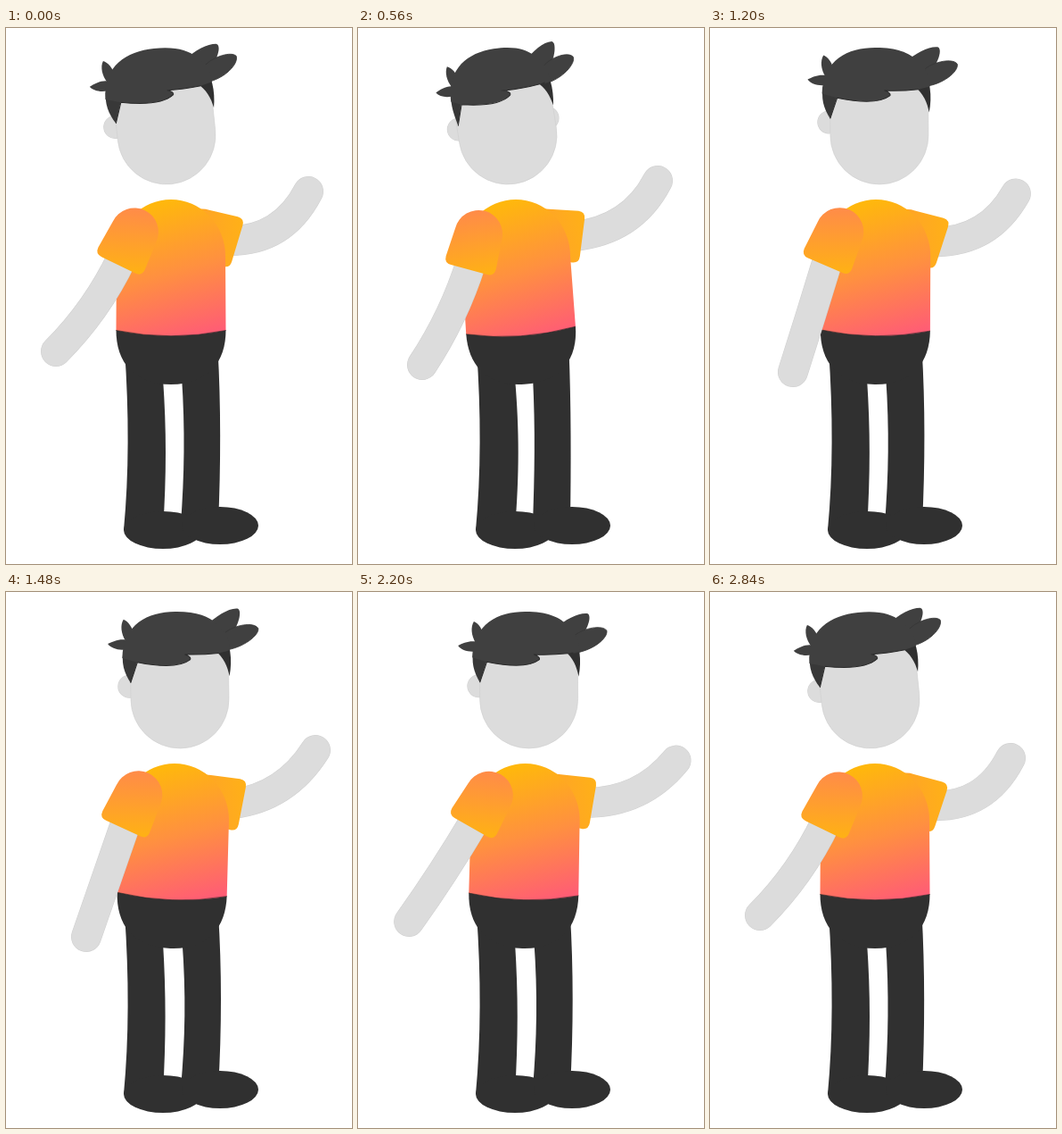
Recreate the animation shown at these times as an HTML page with a canvas. Size 388x600 px, loop 2880 ms.

```html
<!DOCTYPE html>
<html lang="en">
<head>
<meta charset="utf-8">
<title>Waving figure</title>
<style>
  html, body { margin: 0; width: 100%; height: 100%; overflow: hidden; background: #fff; }
  canvas { display: block; width: 388px; height: 600px; }
</style>
</head>
<body>
<canvas id="stage"></canvas>
<script>
const LOOP = 2880, STEP = 40, RAD = Math.PI / 180;
const SKIN = '#dcdcdc', SKIN_EDGE = '#cfcfcf', PANTS = '#303030', HAIR = '#404040';

const canvas = document.getElementById('stage');
const ctx = canvas.getContext('2d');
const scale = window.devicePixelRatio || 1;
canvas.width = 388 * scale;
canvas.height = 600 * scale;

// Smooth periodic track without overshoot between its keys.
function track(times, values) {
  const n = times.length;
  const time = i => times[(i + n) % n] + LOOP * Math.floor(i / n);
  const value = i => values[(i + n) % n];
  const span = i => time(i + 1) - time(i);
  const slope = i => (value(i + 1) - value(i)) / span(i);
  const tangent = i => {
    const a = slope(i - 1), b = slope(i);
    if (a * b <= 0) return 0;
    const h0 = span(i - 1), h1 = span(i);
    return 3 * (h0 + h1) / ((2 * h1 + h0) / a + (h1 + 2 * h0) / b);
  };
  return t => {
    let i = n - 1;
    while (times[i] > t) i--;
    const h = span(i), u = (t - time(i)) / h, v = 1 - u;
    return value(i) * v * v * (1 + 2 * u) + value(i + 1) * u * u * (3 - 2 * u)
      + h * u * v * (tangent(i) * v - tangent(i + 1) * u);
  };
}

const bodyTimes = [0, 560, 920, 1480, 1920, 2520, 2840];
const waveTimes = [0, 200, 560, 920, 1480, 1920, 2520, 2840];
const body = (...values) => track(bodyTimes, values);
const wave = (...values) => track(waveTimes, values);

const pose = {
  lean: body(0, -4, -1, 2, 4, -2, 0),
  headX: body(180, 168, 184, 195, 206, 174, 180),
  headTurn: body(-6, -9, 0, -0.8, 4.4, -6, -6),
  profile: body(0, 1, 0, 0, 0, 0.25, 0),
  ruffle: body(0, 0.7, 0, 0.9, 0, 1, 0),
  droop: body(0, 3.5, 0, 0, 1.5, 3.5, 0),
  frontSleeve: body(26, 15, 21.8, 24.7, 32.8, 25.6, 26),
  frontX: body(56, 72, 94, 90, 65, 53, 56),
  frontY: body(362, 377, 383, 386, 369, 369, 362),
  bow: body(11, 9, 2, 0, 0, 8, 11),
  backSleeve: wave(16.8, 10, 7.2, 25, 11, 12.7, 6, 18.5),
  backX: wave(339, 341, 336, 340, 347, 367, 341, 337),
  backY: wave(183, 172, 171, 194, 177, 200.5, 174, 186)
};

function fill(path, color) {
  ctx.fillStyle = color;
  ctx.fill(typeof path === 'string' ? new Path2D(path) : path);
}

function line(path, color, width) {
  ctx.strokeStyle = color;
  ctx.lineWidth = width;
  ctx.stroke(typeof path === 'string' ? new Path2D(path) : path);
}

function gradient(x0, y0, x1, y1, ...colors) {
  const g = ctx.createLinearGradient(x0, y0, x1, y1);
  colors.forEach((c, i) => g.addColorStop(i / (colors.length - 1), c));
  return g;
}

function at(x, y, degrees, draw) {
  ctx.save();
  ctx.translate(x, y);
  ctx.rotate(degrees * RAD);
  draw();
  ctx.restore();
}

function ellipse(x, y, rx, ry, color) {
  const path = new Path2D();
  path.ellipse(x, y, rx, ry, 0, 0, Math.PI * 2);
  fill(path, color);
}

function arm(x0, y0, cx, cy, x1, y1) {
  const path = `M${x0},${y0} Q${cx},${cy} ${x1},${y1}`;
  ctx.lineCap = 'round';
  line(path, SKIN_EDGE, 34);
  line(path, SKIN, 33);
  ctx.lineCap = 'butt';
}

function sleeve(x, y, degrees, from, to) {
  at(x, y, degrees, () => fill(
    'M-27,0 A27,27 0 0 1 27,0 L29,33 Q29,41 21,41 L-21,41 Q-29,41 -29,33 Z',
    gradient(-14, -22, 14, 42, from, to)));
}

function backArm(p) {
  const x = 220 + 2.3 * p.lean, y = 229.5 + Math.max(0, p.lean);
  const dx = Math.cos(p.backSleeve * RAD), dy = Math.sin(p.backSleeve * RAD);
  const stretch = Math.max(0, p.backX - 340);
  arm(x + 30 * dx, y + 30 * dy,
    p.backX - 29 - 0.65 * stretch, p.backY + 56 - 0.45 * stretch, p.backX, p.backY);
  sleeve(x, y, p.backSleeve - 90, '#ff9d30', '#ffb018');
}

function frontArm(p) {
  const x = 144 + 2.2 * p.lean, y = 228.5 - 0.6 * p.lean;
  const sx = x - 32 * Math.sin(p.frontSleeve * RAD), sy = y + 32 * Math.cos(p.frontSleeve * RAD);
  const dx = p.frontX - sx, dy = p.frontY - sy, k = p.bow / Math.hypot(dx, dy);
  arm(sx, sy, (sx + p.frontX) / 2 + dy * k, (sy + p.frontY) / 2 - dx * k, p.frontX, p.frontY);
  sleeve(x, y, p.frontSleeve, '#ff8c48', '#ffb016');
}

function legs(lean) {
  const s = lean / 2;
  fill(`M133,360 C138,430 138,500 132,562 L176,562
    C${180 - s / 2},500 ${180 - s / 2},450 176,392 L180,360 Z`, PANTS);
  fill(`M${197 + s / 2},390 C${201 + s},450 ${200 + s},500 196,556 L238,556
    C${241 + s},490 ${241 + s},420 ${237.5 + s / 2},360 L190,360 Z`, PANTS);
  ellipse(176, 562, 44, 21, PANTS);
  ellipse(240, 557, 43, 21, PANTS);
}

function torso(lean) {
  const hip = 185 + 0.6 * lean, chest = 185 + 2 * lean;
  const dx = 61.5 * Math.cos(lean * RAD), dy = 61.5 * Math.sin(lean * RAD);
  at(hip, 338, lean, () => fill('M-61.5,0 C-61.5,36 -42,61 0,61 C42,61 61.5,36 61.5,0 Z', PANTS));
  const hem = `${hip + dx},${338.5 + dy} Q${hip},351 ${hip - dx},${338.5 - dy}`;
  fill(`M${hip - dx},${338.5 - dy} L${chest - 61},255 A61,63 0 0 1 ${chest + 61},255 L${hem} Z`,
    gradient(chest - 17, 198, hip + 24, 348, '#ffb70d', '#ff9040', '#ff5c75'));
  line('M' + hem, '#262626', 0.6);
}

function leaves(ruffle) {
  const tip = -96 - 5 * ruffle, side = 87 + 2 * ruffle, low = -80 + 2 * ruffle;
  fill('M-50,-70 C-52,-82 -57,-88 -62,-90 C-66,-84 -65,-74 -60,-66 Z', HAIR);
  fill('M-56,-66 C-64,-70 -74,-66 -80,-63 C-76,-57 -64,-54 -54,-58 Z', HAIR);
  fill(`M30,-82 C42,-92 56,${tip - 1} 66,${tip} C72,${tip + 2} 66,-80 60,-74 L44,-68 Z`, HAIR);
  const lock = `M52,-74 C62,-82 ${side - 5},-86 ${side},${low} C${side + 2},-71 72,-56 50,-54`;
  fill(lock, HAIR);
  line(lock, '#363636', 0.8);
}

function hair(p) {
  const slide = -5 * p.profile;
  const burn = `${slide - 55},-19`;
  const fringe = `Q24,-49 ${6 + slide},-50 C${10 + slide},-49 ${14 + slide},-46 ${12 + slide},-44
    C${4 + slide},-38 ${slide - 14},-35 ${slide - 47},-42`;
  fill(`M-62,-58 C-66,-42 -62,-30 ${burn} L${slide - 47},-43 Z`, '#383838');
  fill('M40,-54 C50,-46 54,-36 56,-25 C60,-44 57,-62 50,-74 Z', PANTS);
  at(0, p.droop, 0, () => leaves(p.ruffle));
  fill(`M-64,-47 C-62,-85 -35,-98 -4,-98 C20,-98 34,-92 42,-84 C52,-76 57,-66 57,-54
    L44,-51 ${fringe} Z`, HAIR);
  line(`M44,-51 ${fringe} L${burn}`, '#2b2b2b', 1);
}

function head(p) {
  at(p.headX, 120, p.headTurn, () => {
    for (const x of [3 * p.profile - 56.5, 37 + 10 * p.profile]) {
      const y = x < 0 ? -15 : -12;
      ellipse(x, y, 13, 13, SKIN_EDGE);
      ellipse(x, y, 12.5, 12.5, SKIN);
    }
    const face = 'M-55,-58 L-55,0 A55,55 0 0 0 55,0 L55,-58 Z';
    fill(face, SKIN);
    line(face, SKIN_EDGE, 0.6);
    ctx.translate(3 * p.profile, 0);
    ctx.scale(1 - 0.06 * p.profile, 1);
    hair(p);
  });
}

function draw(now) {
  const t = Math.floor(now % LOOP / STEP) * STEP;
  const p = {};
  for (const name in pose) p[name] = pose[name](t);
  ctx.setTransform(scale, 0, 0, scale, 0, 0);
  ctx.fillStyle = '#fff';
  ctx.fillRect(0, 0, 388, 600);
  backArm(p);
  legs(p.lean);
  torso(p.lean);
  frontArm(p);
  head(p);
}

function tick() {
  draw(performance.now());
  requestAnimationFrame(tick);
}
tick();
</script>
</body>
</html>
```
